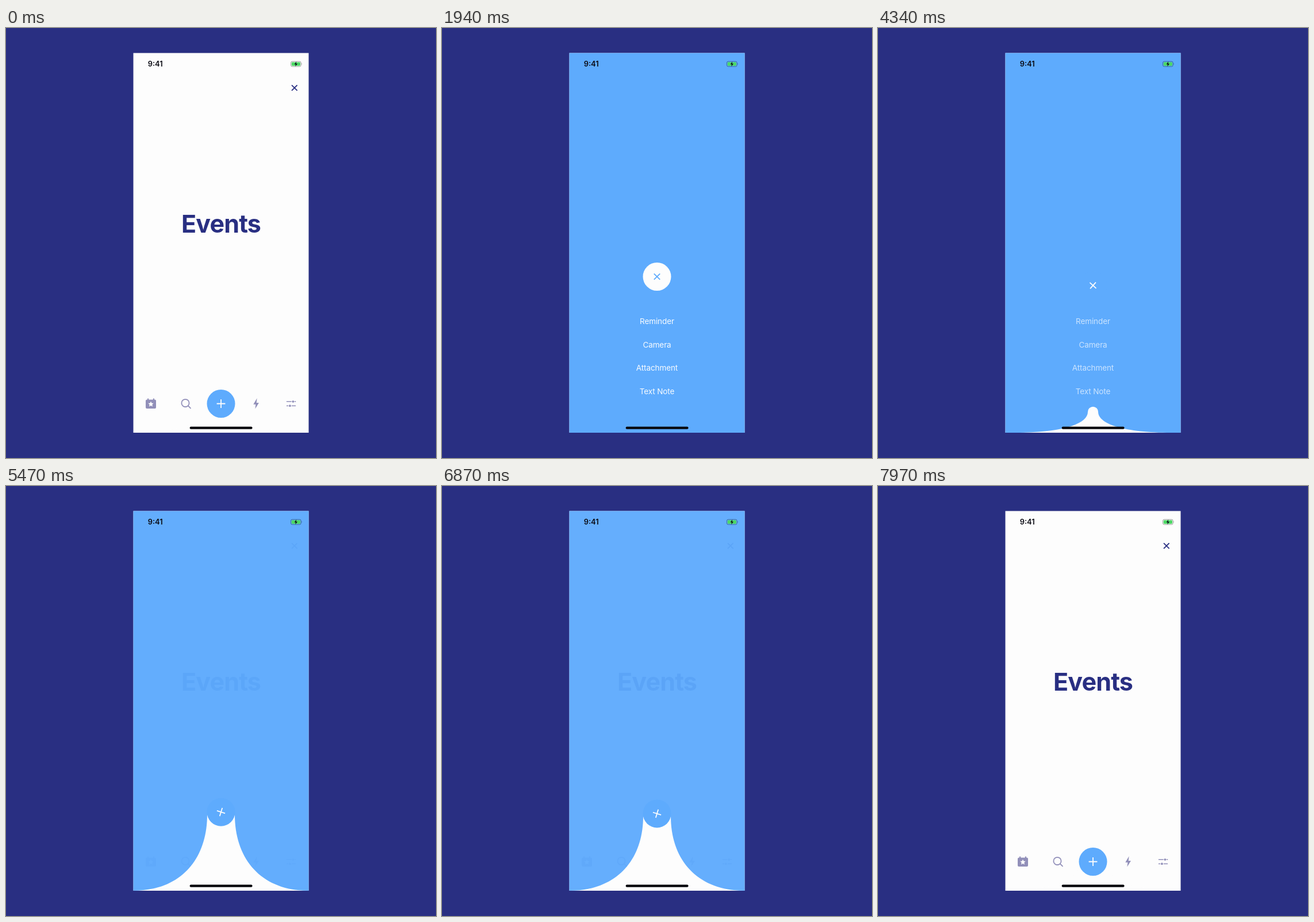
Recreate the animation shown at these times as an HTML page. Size 748 px wide and 748 px high, loop 8000 ms.

```html
<!DOCTYPE html>
<html lang="en">
<head>
<meta charset="utf-8">
<title>Events menu</title>
<style>
  html, body { margin: 0; width: 100%; height: 100%; overflow: hidden; background: #292f82; }
  svg { display: block; width: 100%; height: 100%; }
  text { font-family: Inter, "Liberation Sans", sans-serif; }
  .mid { text-anchor: middle; }
  .title { font-size: 43px; font-weight: 700; letter-spacing: -.8px; fill: #292f82; }
  .time { font-size: 12.8px; font-weight: 600; fill: #0b0b14; }
  .label { font-size: 13.5px; letter-spacing: -.1px; fill: #fff; }
  .line { fill: none; stroke: #918fb9; stroke-width: 1.8; stroke-linecap: round; }
  .solid { fill: #918fb9; }
</style>
</head>
<body>
<svg viewBox="0 0 748 748">
  <defs>
    <clipPath id="screen"><rect x="221.5" y="43.5" width="305" height="660.5"/></clipPath>
  </defs>
  <rect width="748" height="748" fill="#292f82"/>
  <g clip-path="url(#screen)">
    <rect x="221" y="43" width="306" height="662" fill="#fdfdfd"/>

    <path d="M497 99.3l9.6 9.6m0-9.6l-9.6 9.6" fill="none" stroke="#292f82" stroke-width="1.8"/>
    <text class="title mid" x="374" y="356.3">Events</text>

    <!-- tab bar -->
    <path class="solid" d="M245 646.5h1v-2h2.2v2h7.6v-2h2.2v2h1a2 2 0 0 1 2 2v11.5a2 2 0 0 1-2 2h-14a2 2 0 0 1-2-2v-11.5a2 2 0 0 1 2-2z"/>
    <path fill="#fdfdfd" d="M252 649.4l1.4 3 3.3.4-2.4 2.3.6 3.3-2.9-1.6-2.9 1.6.6-3.3-2.4-2.3 3.3-.4z"/>
    <g class="line">
      <circle cx="312" cy="652.4" r="6.6"/>
      <path d="M317 657.4l4 4"/>
      <path stroke-width="1.6" d="M488.5 649.8h7.5m6.4 0h1.2M488.5 657.2h2m7 0h6"/>
    </g>
    <path class="solid" d="M436.6 644l-6.3 10.8h4.1l-1 7.8 6.5-10.6h-4.2z"/>
    <circle class="solid" cx="499.3" cy="649.8" r="1.9"/>
    <circle class="solid" cx="493.9" cy="657.2" r="1.9"/>

    <rect id="overlay" x="221" y="43" width="306" height="662" fill="#5eabfd"/>
    <path id="hill" fill="#fdfdfd"/>
    <g id="labels" class="mid">
      <text class="label" x="374" y="515">Reminder</text>
      <text class="label" x="374" y="555.7">Camera</text>
      <text class="label" x="374" y="596.4">Attachment</text>
      <text class="label" x="374" y="637.1">Text Note</text>
    </g>
    <g id="button">
      <circle id="disc" r="24.5"/>
      <path id="plus" d="M-7.4 0h14.8M0-7.4v14.8" fill="none" stroke-width="1.8"/>
    </g>

    <!-- status bar and home indicator -->
    <text class="time" x="246.8" y="67">9:41</text>
    <rect x="495.4" y="58.2" width="17.8" height="8.8" rx="2.5" fill="none" stroke="#000" stroke-opacity=".42" stroke-width=".9"/>
    <rect x="496.7" y="59.5" width="15.2" height="6.2" rx="1.4" fill="#4cd964"/>
    <path d="M514.2 61.1q1.5 1.5 0 3z" fill="#000" fill-opacity=".45"/>
    <path d="M505.2 58.3l-3.6 4.9h2.3l-.6 3.9 3.7-5.2h-2.4z" fill="#101020"/>
    <rect x="319.6" y="693.6" width="109" height="4.2" rx="2.1" fill="#08080c"/>
  </g>
</svg>
<script>
  const LOOP = 8000, OPEN_MS = 720, CLOSE_MS = 600;
  const TAPS = [[90, 2080], [3737, 5127], [6570, 7300]]; // open, close
  const BLUE = [94, 171, 253], WHITE = [253, 253, 253];
  const CX = 374, BASE = 704, DETACH = 0.45, LANDED = 0.93;

  const $ = id => document.getElementById(id);
  const [overlay, hill, labels, button, disc, plus] =
    ["overlay", "hill", "labels", "button", "disc", "plus"].map($);

  const clamp = v => Math.min(1, Math.max(0, v));
  const smooth = v => { v = clamp(v); return v * v * (3 - 2 * v); };
  const mix = (a, b, k) => `rgb(${a.map((v, i) => Math.round(v + (b[i] - v) * k))})`;
  const progress = t => TAPS.reduce((sum, [open, close]) =>
    sum + clamp((t - open) / OPEN_MS) - clamp((t - close) / CLOSE_MS), 0);
  const buttonY = p => 653.5 - 221 * smooth(p);

  // The hill hangs on the button, then lets go, narrows and sinks.
  function hillPath(p) {
    const u = clamp((p - DETACH) / (LANDED - DETACH));
    if (u >= 1) return "";
    const start = buttonY(Math.min(p, DETACH)) + 4;
    const y = start + (710 - start) * u ** 1.62;
    const w = 24 - 18.5 * u, span = 153 - 24 * u * u;
    const shoulder = y + (BASE - y) * 0.6;
    const foot = span - (span - w) * 0.63;
    return `M${CX - span} ${BASE + 1}V${BASE}` +
      `C${CX - foot} ${BASE} ${CX - w} ${shoulder} ${CX - w} ${y}` +
      `A${w} ${w} 0 0 1 ${CX + w} ${y}` +
      `C${CX + w} ${shoulder} ${CX + foot} ${BASE} ${CX + span} ${BASE}v1z`;
  }

  function draw(t) {
    const p = progress(t);
    const invert = smooth((p - 0.85) / 0.15);
    overlay.setAttribute("opacity", smooth(p / 0.48));
    hill.setAttribute("d", hillPath(p));
    labels.setAttribute("opacity", 0.96 * clamp((p - 0.55) / 0.41));
    button.setAttribute("transform", `translate(${CX} ${buttonY(p)})`);
    disc.setAttribute("fill", mix(BLUE, WHITE, invert));
    plus.setAttribute("stroke", mix(WHITE, BLUE, invert));
    plus.setAttribute("transform", `rotate(${45 * smooth(p)})`);
  }

  const begin = performance.now();
  function frame() {
    draw((performance.now() - begin) % LOOP);
    requestAnimationFrame(frame);
  }
  frame();
</script>
</body>
</html>
```
